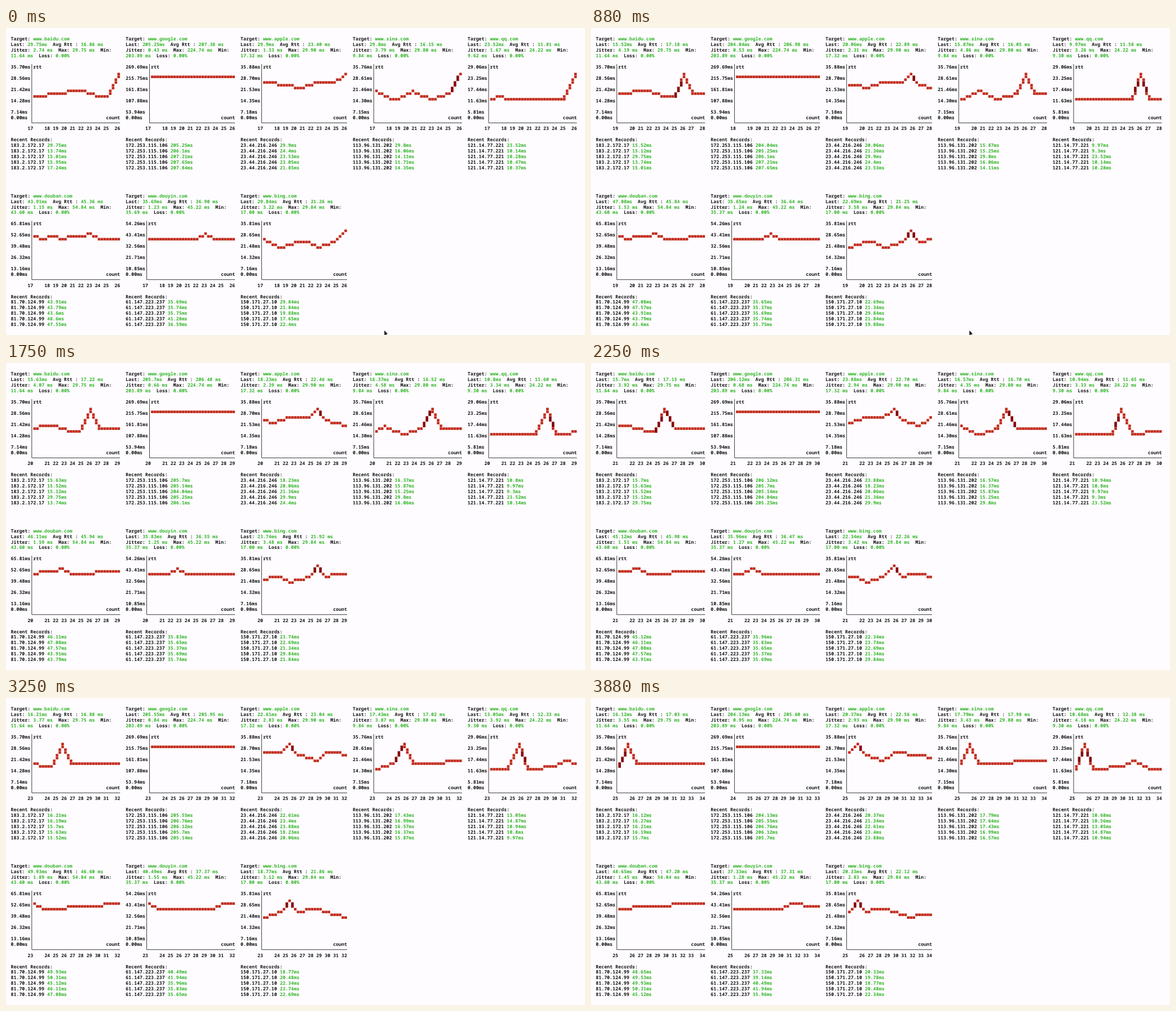
Write an HTML page that moves like this. It is 1027x545 px and loops after 4.01 s.

```html
<!DOCTYPE html>
<html lang="en">
<head>
<meta charset="utf-8">
<title>Ping monitor</title>
<style>
  html, body { margin: 0; width: 100%; height: 100%; overflow: hidden; background: #fefcff; }
  svg { display: block; width: 1027px; height: 545px; }
  text {
    font: 600 8.285px "Noto Sans Mono", "DejaVu Sans Mono", monospace;
    white-space: pre;
    text-rendering: geometricPrecision;
    fill: #161616;
  }
  .val { fill: #35b52b; }
  .axis { fill: none; stroke: #3c3c3c; stroke-width: 1; }
  .half { fill: #c22a1b; }
  .full { fill: #840508; }
</style>
</head>
<body>
<svg viewBox="0 0 1027 545">
  <g id="panels"></g>
  <path id="cursor" d="M671 536.5v9.5l2.1-1.9 1.4 3.2 1.5-.7-1.4-3h2.9z" fill="#000" stroke="#fff" stroke-width=".5"/>
</svg>
<script>
const LOOP = 4010, TICK = 500, PHASE = 120;
const CW = 4.971, LH = 9.938, LEFT = 8.5, TOP = 14.4;   // character grid
const WINDOW = 10, ROWS = 10, START = 26;
const PER_ROW = 5, ROW_STEP = 28, PANEL = 40.75;        // panel layout in characters

// keys: the turning points of the round-trip time, by sample number.
const hosts = [
  { host: "www.baidu.com", ip: "183.2.172.17", min: 11.64,
    keys: { 18: 13.54, 21: 17.82, 25: 13.74, 26: 29.75, 27: 15.12, 34: 16.12 } },
  { host: "www.google.com", ip: "172.253.115.106", min: 203.89, max: 224.74, late: 130,
    keys: { 23: 207.65, 27: 204.04, 31: 206.76, 33: 204.13 } },
  { host: "www.apple.com", ip: "23.44.216.246", min: 17.32,
    keys: { 17: 23.57, 21: 20.74, 25: 24.4, 26: 29.9, 27: 21.36, 29: 18.23, 30: 23.88, 34: 20.37 } },
  { host: "www.sina.com", ip: "113.96.131.202", min: 9.84,
    keys: { 17: 17.32, 19: 11.72, 21: 16.94, 23: 11.71, 25: 16.06, 26: 29.8, 27: 15.25, 34: 17.79 } },
  { host: "www.qq.com", ip: "121.14.77.221", min: 9.62, max: 24.22,
    keys: { 17: 10.67, 25: 10.14, 26: 23.52, 27: 9.3, 30: 10.94, 31: 14.87, 33: 10.56 } },
  { host: "www.douban.com", ip: "81.70.124.99", min: 43.6, max: 54.84,
    keys: { 20: 44.69, 23: 48.6, 24: 43.6, 26: 43.91, 27: 47.57, 30: 45.12, 31: 50.31, 34: 48.65 } },
  { host: "www.douyin.com", ip: "61.147.223.237", min: 35.75, max: 45.22,
    keys: { 22: 36.59, 23: 41.28, 24: 35.75, 27: 35.37, 30: 35.96, 31: 41.94, 34: 37.33 } },
  { host: "www.bing.com", ip: "150.171.27.10", min: 17,
    keys: { 17: 23.66, 19: 17, 22: 22.4, 23: 17.65, 25: 21.84, 26: 29.84, 27: 21.34, 29: 23.74, 32: 18.77, 34: 20.33 } }
];

const n = v => v.toFixed(2);
const fix = v => n(v + 1e-6);
const px = col => col * CW;
const py = row => row * LH;

function noise(seed, i) {
  const v = Math.sin(seed * 12.9898 + i * 78.233) * 43758.5453;
  return v - Math.floor(v);
}

// Straight between the turning points, with a little seeded jitter.
function sample(h, i) {
  if (i in h.keys) return h.keys[i];
  const at = Object.keys(h.keys).map(Number);
  const a = at.findLast(k => k < i) ?? at[0];
  const b = at.find(k => k > i) ?? a;
  const f = a < b ? (i - a) / (b - a) : 0;
  const v = h.keys[a] + (h.keys[b] - h.keys[a]) * f;
  return +n(v + noise(h.seed, i) * .5);
}

const label = (col, row, str, cls = "") =>
  `<text class="${cls}" x="${n(px(col))}" y="${n(py(row) + 8)}">${str}</text>`;

// One line of alternating plain and coloured parts.
function line(row, ...parts) {
  let col = 0;
  return parts.map((str, i) => {
    const out = label(col, row, str, i % 2 ? "val" : "");
    col += str.length;
    return out;
  }).join("");
}

// Bresenham walk on the half-block grid.
function walk([x1, y1], [x2, y2], plot) {
  const dx = Math.abs(x2 - x1), dy = Math.abs(y2 - y1);
  if (dy < dx) {
    const s = Math.sign(y2 - y1);
    for (let x = x1, y = y1, d = 2 * dy - dx; x <= x2; x++) {
      plot(x, y);
      if (d > 0) { y += s; d -= 2 * dx; }
      d += 2 * dy;
    }
  } else {
    if (y1 > y2) [x1, y1, x2, y2] = [x2, y2, x1, y1];
    const s = Math.sign(x2 - x1);
    for (let y = y1, x = x1, d = 2 * dx - dy; y <= y2; y++) {
      plot(x, y);
      if (d > 0) { x += s; d -= 2 * dy; }
      d += 2 * dx;
    }
  }
}

function plotCells(vals, top, left, width) {
  const on = new Set();
  const pts = vals.map((v, i) => [
    Math.floor(i * (width - 1) / (WINDOW - 1)),
    Math.floor((1 - v / top) * (2 * ROWS - 1))
  ]);
  for (let i = 1; i < pts.length; i++) walk(pts[i - 1], pts[i], (x, y) => on.add(y * 100 + x));

  // Both halves of one character cell merge into a darker full block.
  let out = "";
  for (const key of on) {
    const x = key % 100, y = (key - x) / 100;
    const paired = on.has((y ^ 1) * 100 + x);
    if (paired && y % 2) continue;
    out += `<rect class="${paired ? "full" : "half"}" x="${n(px(left + x) + .15)}" y="${n(py(5 + y / 2) + .5)}"` +
      ` width="4.6" height="${paired ? 9.6 : 4.5}"/>`;
  }
  return out;
}

function chart(h, vals, last) {
  const top = h.max * 1.2, first = last - WINDOW + 1;
  const left = (fix(top) + "ms").length + 1, width = h.cols - left;
  const step = Math.floor(width / (WINDOW - 1));
  let out = "";
  for (let i = 0; i <= 5; i++) out += label(0, 14 - Math.floor(i * 9 / 5), fix(top * i / 5) + "ms");
  out += label(left, 5, "rtt") + label(h.cols - 5, 14, "count");
  out += `<path class="axis" d="M${n(px(left - .5))} ${n(py(5))}V${n(py(15.5))}H${n(px(h.cols))}"/>`;
  for (let i = 0; i < WINDOW; i++) {
    const col = i == 0 ? left - 2 : i == WINDOW - 1 ? h.cols - 2 : left + step * i + 1;
    out += label(col, 16, first + i);
  }
  return out + plotCells(vals, top, left, width);
}

function panel(h, last) {
  const vals = Array.from({ length: WINDOW }, (_, i) => sample(h, last - WINDOW + 1 + i));
  const avg = vals.reduce((a, b) => a + b) / WINDOW;
  let jitter = 0;
  for (let i = 1; i < WINDOW; i++) jitter += Math.abs(vals[i] - vals[i - 1]) / (WINDOW - 1);

  let out = line(0, "Target: ", h.host) +
    line(1, "Last: ", vals[WINDOW - 1] + "ms", "  Avg Rtt : ", fix(avg) + " ms") +
    line(2, "Jitter: ", fix(jitter) + " ms", "  Max: ", fix(h.max) + " ms", "  Min:") +
    line(3, "", fix(Math.min(h.min, ...vals)) + " ms", "  Loss: ", "0.00%") +
    chart(h, vals, last) +
    line(18, "Recent Records:");
  for (let i = 0; i < 5; i++) out += line(19 + i, h.ip + " ", vals[WINDOW - 1 - i] + "ms");
  return out;
}

const root = document.getElementById("panels");
const cursor = document.getElementById("cursor");
hosts.forEach((h, i) => {
  const slot = i % PER_ROW, row = Math.floor(i / PER_ROW) * ROW_STEP;
  const col = Math.round(slot * PANEL);
  h.cols = Math.round((slot + 1) * PANEL) - col - 2;
  h.seed = i + 1;
  h.max ??= Math.max(...Object.values(h.keys));
  h.node = document.createElementNS("http://www.w3.org/2000/svg", "g");
  h.node.setAttribute("transform", `translate(${n(LEFT + px(col))} ${n(TOP + py(row))})`);
  root.append(h.node);
});

function draw() {
  const t = performance.now() % LOOP;
  for (const h of hosts) {
    const last = START + Math.max(0, Math.floor((t + PHASE - (h.late || 0)) / TICK));
    if (last !== h.last) {
      h.last = last;
      h.node.innerHTML = panel(h, last);
    }
  }
  cursor.style.display = t < 1750 ? "" : "none";
  requestAnimationFrame(draw);
}
draw();
</script>
</body>
</html>
```
